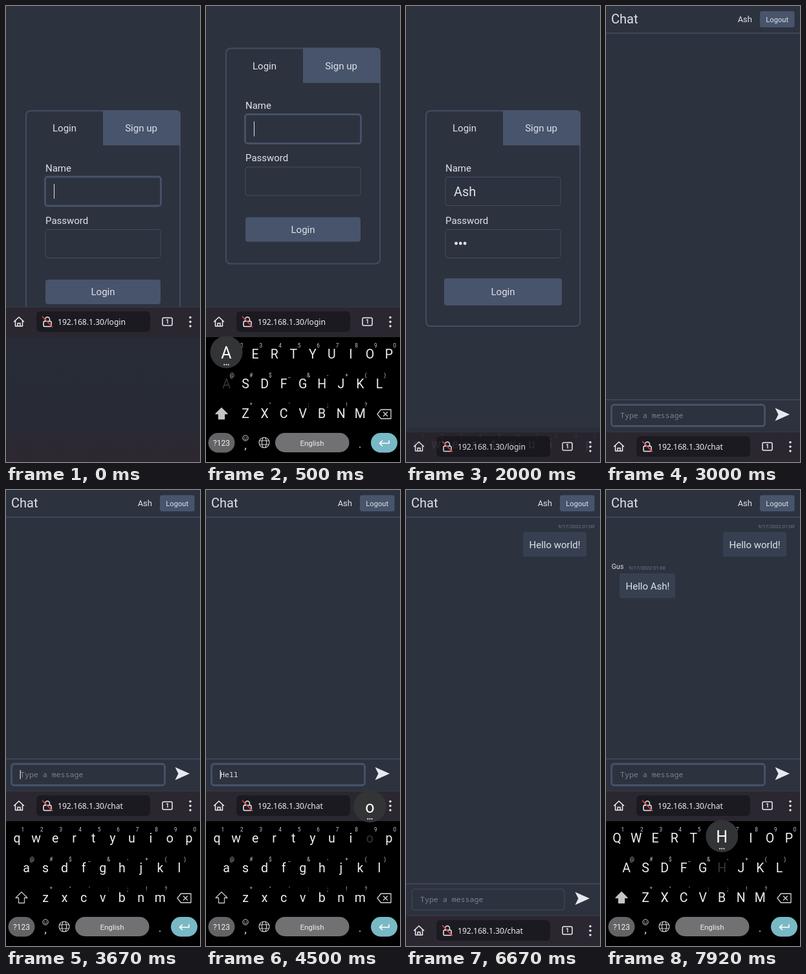
Animation, 300 px wide and 705 px high, one loop 8000 ms. Source, as an HTML page:

```html
<!DOCTYPE html>
<html lang="en">
<head>
<meta charset="utf-8">
<title>Chat login</title>
<style>
  html, body { margin: 0; width: 100%; height: 100%; overflow: hidden; background: #2d323f; }
  svg { display: block; width: 300px; height: 705px; font-family: Roboto, sans-serif; }
  text { white-space: pre; }
  .mono { font-family: "Noto Sans Mono", "DejaVu Sans Mono", monospace; }
  .url { font-family: "Noto Sans", "Open Sans", sans-serif; }
</style>
</head>
<body>
<svg id="stage" viewBox="0 0 300 705" xmlns="http://www.w3.org/2000/svg">
  <defs>
    <linearGradient id="under" x1="0" y1="512" x2="0" y2="705" gradientUnits="userSpaceOnUse">
      <stop offset="0" stop-color="#272c37"/>
      <stop offset=".7" stop-color="#282b36"/>
      <stop offset=".8" stop-color="#2c2933"/>
      <stop offset="1" stop-color="#2d2731"/>
    </linearGradient>
    <clipPath id="view"><rect id="viewRect" width="300" height="658"/></clipPath>
  </defs>
</svg>
<script>
const LOOP = 8000, BAR_UP = 465, BAR_DOWN = 658;
const USER = 'Ash', FRIEND = 'Gus', DATE = '9/17/2022 01:00';
const C = { bg: '#2d323f', line: '#434d61', fill: '#48546b', text: '#dde1ea', bubble: '#374050', white: '#eeeef2' };

// [keyboard opens, keyboard closes]
const KEYBOARD = [[0, 1750], [3420, 5750], [7580, 9000]];
const CAPS = [[330, 570], [3750, 4000], [5640, 6100], [7750, 8000]];
const PASSWORD_AT = 920, CHAT_AT = 2170, SEND_AT = 5580, REPLY_AT = 6920;
const POP = 125, LAG = 80;

// [time, character, key when it differs]
const NAME = [[490, 'A'], [630, 's'], [750, 'h']];
const PASS = [[1080, 'a'], [1250, 's'], [1420, 'h']];
const MESSAGE = [[3920, 'H'], [4080, 'e'], [4230, 'l'], [4370, 'l'], [4490, 'o'], [4680, ' '],
  [4820, 'w'], [4940, 'o'], [5060, 'r'], [5170, 'l'], [5280, 'd'], [5400, '!', 'n']];
const PRESSES = [...NAME, ...PASS, ...MESSAGE, [7900, 'H']];

const stage = document.getElementById('stage');
const viewRect = document.getElementById('viewRect');

function el(parent, tag, attrs = {}) {
  const node = document.createElementNS('http://www.w3.org/2000/svg', tag);
  set(node, attrs);
  return parent.appendChild(node);
}
function set(node, attrs) {
  for (const k in attrs) node.setAttribute(k, attrs[k]);
}
const group = (p, attrs) => el(p, 'g', attrs);
const rect = (p, x, y, width, height, rx, fill, more) => el(p, 'rect', { x, y, width, height, rx, fill, ...more });
const path = (p, d, stroke, width = 1.4, more) =>
  el(p, 'path', { d, fill: 'none', stroke, 'stroke-width': width, 'stroke-linejoin': 'round', 'stroke-linecap': 'round', ...more });
function label(p, x, y, size, str, fill = C.text, anchor = 'start', more) {
  const node = el(p, 'text', { x, y, 'font-size': size, fill, 'text-anchor': anchor, ...more });
  node.textContent = str;
  return node;
}
const dot = (p, cx, cy, r, fill) => el(p, 'circle', { cx, cy, r, fill });
const show = (node, on) => node.setAttribute('display', on ? 'inline' : 'none');
const move = (node, y) => node.setAttribute('transform', `translate(0 ${y})`);
const clamp = v => Math.max(0, Math.min(1, v));
const within = (list, t) => list.some(([a, b]) => t >= a && t < b);

rect(stage, 0, 0, 300, 705, 0, 'url(#under)');
const page = group(stage, { 'clip-path': 'url(#view)' });
rect(page, 0, 0, 300, 705, 0, C.bg);

// Inputs with a thin resting border and a thick focused one
function makeField(p, x, y, w, h) {
  const box = rect(p, x, y, w, h, 4, 'none', { stroke: C.line });
  return on => set(box, {
    x: on ? x : x + .5, y: on ? y : y + .5, width: on ? w : w - 1, height: on ? h : h - 1,
    'stroke-width': on ? 2.8 : 1, stroke: on ? '#465369' : C.line
  });
}

// Login page
const login = group(page);
rect(login, 31, 162, 238, 333, 7, 'none', { stroke: C.line, 'stroke-width': 2 });
el(login, 'path', { d: 'M150 161H263Q270 161 270 168V215.500H150Z', fill: C.fill });
label(login, 90.5, 194, 15, 'Login', C.text, 'middle');
label(login, 209, 194, 15, 'Sign up', C.text, 'middle');
label(login, 61, 255.500, 15, 'Name');
label(login, 61, 336.500, 15, 'Password');
const nameField = makeField(login, 60.5, 264, 179, 45);
const passField = makeField(login, 60.5, 345, 179, 45);
const nameText = label(login, 74, 294, 20, '');
const nameLine = rect(login, 74, 297, 0, 1, 0, C.text);
const passDots = PASS.map((_, i) => dot(login, 77.5 + i * 6.8, 367, 2.4, C.text));
const loginCaret = rect(login, 74, 275, 1, 23, 0, C.text);
const button = rect(login, 61, 423, 178, 38, 4, C.fill);
label(login, 150, 447, 15, 'Login', C.text, 'middle');

// Chat page
const chat = group(page);
label(chat, 8, 27, 20, 'Chat');
label(chat, 226, 25, 13, USER, C.text, 'end');
rect(chat, 238, 8, 53.5, 25, 3, C.fill);
label(chat, 264.7, 24.5, 11.2, 'Logout', C.text, 'middle');
rect(chat, 0, 41.2, 300, 1.6, 0, C.line);

function bubble(x, y, w, str) {
  rect(sentOrReply, x, y, w, 38, 3, C.bubble);
  label(sentOrReply, x + 9.5, y + 24.500, 15, str);
}
let sentOrReply = group(chat);
const sent = sentOrReply;
label(sent, 291.5, 59, 7.5, DATE, '#727a89', 'end');
bubble(181, 65, 98, 'Hello world!');
sentOrReply = group(chat);
const reply = sentOrReply;
label(reply, 8.5, 122, 10.8, FRIEND);
label(reply, 35.5, 123, 7.5, DATE, '#727a89');
bubble(21, 129, 86, `Hello ${USER}!`);

// Message row, placed relative to the top of the address bar
const row = group(chat);
rect(row, 0, -50, 300, 1.4, 0, C.line);
const chatField = makeField(row, 8.500, -41.500, 237, 33);
const mono = { class: 'mono' };
const hint = label(row, 22, -21, 11.6, 'Type a message', '#7b8392', 'start', mono);
const chatText = label(row, 22, -21, 11.6, '', C.text, 'start', mono);
const chatLine = rect(row, 22, -19.500, 0, 1, 0, C.text);
const chatCaret = rect(row, 22, -32, 1.2, 14, 0, C.text);
el(row, 'path', { d: 'M261.500 -36.500L284 -26.500L261.500 -16.500L266.500 -26.500Z', fill: '#e6e9f0' });

// Address bar
const bar = group(stage);
rect(bar, 0, 0, 300, 47, 0, '#2b2731');
rect(bar, 0, 0, 300, 1, 0, '#3a3843');
rect(bar, 47, 7, 176, 32, 6, '#1c1a21');
path(bar, 'M12.500 23L20 16L27.500 23M14.500 21.500V30H25.500V21.500M18 30V25.500H22V30', C.white, 1.5);
rect(bar, 58, 22.500, 12, 8, 1.5, 'none', { stroke: C.white, 'stroke-width': 1.5 });
path(bar, 'M60.500 22V19.500a3.500 3.500 0 0 1 7 0V22', C.white, 1.5);
path(bar, 'M56.500 15.500L71.500 31', '#e2414c', 1.7);
const url = label(bar, 80, 28, 12.1, '', C.white, 'start', { class: 'url' });
rect(bar, 242, 17, 15, 12, 2, 'none', { stroke: C.white, 'stroke-width': 1.5 });
label(bar, 249.500, 26.400, 9, '1', C.white, 'middle', { 'font-weight': 700 });
[16.500, 23.200, 30].forEach(y => dot(bar, 285, y, 1.7, C.white));

// Keyboard
const board = group(stage);
rect(board, 0, 512, 300, 193, 0, '#000');
const keys = {};
[['qwertyuiop', '1234567890', 17, 538], ['asdfghjkl', '@#$_&-+()', 31.500, 584], ['zxcvbnm', '*"\':;!?', 61, 630]]
  .forEach(([letters, hints, x0, y]) => [...letters].forEach((ch, i) => {
    const x = x0 + i * 29.55;
    label(board, x + 8.800, y - 9.800, 8.2, hints[i], '#c8c8cb', 'middle');
    keys[ch] = { x, y, node: label(board, x, y + 6.500, 19.5, ch, C.white, 'middle') };
  }));
const shift = path(board, 'M24 621.500L33 630.500H28.500V638.500H19.500V630.500H15Z', '#c4c4c6', 1.3);
path(board, 'M265 631L270.500 624H286V638H270.500ZM274.500 628L280.500 634M280.500 628L274.500 634', '#d8d8da', 1.3);
rect(board, 3.500, 660, 41, 30.500, 15.2, '#646466');
label(board, 24, 680, 12, '?123', C.white, 'middle');
el(board, 'circle', { cx: 61, cy: 668, r: 4.200, fill: 'none', stroke: '#d0d0d2' });
dot(board, 59.500, 667, .7, '#d0d0d2');
dot(board, 62.500, 667, .7, '#d0d0d2');
path(board, 'M58.800 669.300Q61 671.500 63.200 669.300', '#d0d0d2', .8);
label(board, 61, 685, 16, ',', C.white, 'middle');
path(board, 'M82 675a8 8 0 1 0 16 0a8 8 0 1 0 -16 0M86.500 675a3.500 8 0 1 0 7 0a3.500 8 0 1 0 -7 0M83 672H97M83 678H97', '#d8d8da', 1.1);
rect(board, 107, 660, 114.500, 30, 15, '#717173');
label(board, 164, 679.500, 11.5, 'English', C.white, 'middle');
label(board, 238, 683, 16, '.', C.white, 'middle');
rect(board, 255, 660, 41, 30.500, 15.2, '#78b9c5');
path(board, 'M283 672V676H268.500M272.500 672L268.500 676L272.500 680', '#fff', 1.6);

const popup = group(stage);
dot(popup, 0, 0, 25, '#333436');
const popText = label(popup, 0, 9.500, 25, '', '#fff', 'middle');
[-3.200, 0, 3.200].forEach(x => dot(popup, x, 19.500, 1, '#fff'));

const typed = (list, t) => list.filter(p => t >= p[0] + LAG).map(p => p[1]).join('');

// Blinking restarts on every focus change, tap and inserted character
const WAKE = [0, PASSWORD_AT, CHAT_AT, 3470, 7580, ...PRESSES.map(p => p[0] + LAG)];
function blink(t) {
  const last = Math.max(...WAKE.filter(w => w <= t));
  return Math.floor((t - last) / 250) % 2 === 0;
}

function drawLogin(t, small) {
  move(login, small ? -96.500 : 0);
  const first = t < PASSWORD_AT, second = !first && t < 1750;
  nameField(first);
  passField(second);
  const name = typed(NAME, t);
  nameText.textContent = name;
  const width = name ? nameText.getComputedTextLength() : 0;
  nameLine.setAttribute('width', first ? width : 0);
  const count = typed(PASS, t).length;
  passDots.forEach((d, i) => show(d, i < count));
  set(loginCaret, first ? { x: 74 + width, y: 275 } : { x: 74 + count * 6.8, y: 356 });
  show(loginCaret, (first || second) && blink(t));
  const grow = 2 * clamp((t - 1850) / 130);
  set(button, { x: 61 - grow, y: 423 - grow, width: 178 + 2 * grow, height: 38 + 2 * grow });
}

function drawChat(t, small) {
  move(row, small ? BAR_UP : BAR_DOWN);
  show(sent, t >= SEND_AT + 60);
  show(reply, t >= REPLY_AT);
  const focus = t < 5750 || t >= 7420;
  const msg = t < SEND_AT ? typed(MESSAGE, t) : '';
  chatField(focus);
  show(hint, !msg);
  chatText.textContent = msg;
  const step = hint.getComputedTextLength() / 14;
  const from = msg.lastIndexOf(' ') + 1;
  const word = msg.endsWith('!') ? 0 : msg.length - from;
  set(chatLine, { x: 22 + from * step, width: word * step });
  chatCaret.setAttribute('x', 21.600 + msg.length * step);
  show(chatCaret, focus && blink(t));
}

function drawKeyboard(t) {
  let y = 0, alpha = 0;
  for (const [open, close] of KEYBOARD) {
    if (t >= open && t < close) {
      const p = clamp((t - open - 50) / 190);
      alpha = p;
      y = 150 * (1 - p) ** 2;
    } else if (t >= close && t < close + 270) {
      const p = (t - close) / 270;
      alpha = 1 - p;
      y = 150 * p;
    }
  }
  move(board, y);
  board.setAttribute('opacity', alpha);
  const caps = within(CAPS, t);
  shift.setAttribute('fill', caps ? '#c4c4c6' : 'none');
  const press = PRESSES.find(p => p[1] !== ' ' && t >= p[0] && t < p[0] + POP);
  const held = press && keys[(press[2] || press[1]).toLowerCase()];
  for (const ch in keys) {
    const node = keys[ch].node;
    node.textContent = caps ? ch.toUpperCase() : ch;
    node.setAttribute('fill', keys[ch] === held ? '#363638' : C.white);
  }
  show(popup, !!held);
  if (held) {
    popup.setAttribute('transform', `translate(${held.x} ${held.y - 49})`);
    popText.textContent = press[1];
  }
}

function draw(t) {
  const raised = within(KEYBOARD, t);
  const small = within(KEYBOARD.map(([a, b]) => [a + 80, b]), t);
  const top = raised ? BAR_UP : BAR_DOWN;
  const chatting = t >= CHAT_AT;
  viewRect.setAttribute('height', top);
  move(bar, top);
  url.textContent = '192.168.1.30/' + (chatting ? 'chat' : 'login');
  show(login, !chatting);
  show(chat, chatting);
  if (chatting) drawChat(t, small);
  else drawLogin(t, small);
  drawKeyboard(t);
}

const start = performance.now();
function tick() {
  draw((performance.now() - start) % LOOP);
  requestAnimationFrame(tick);
}
tick();
</script>
</body>
</html>
```
